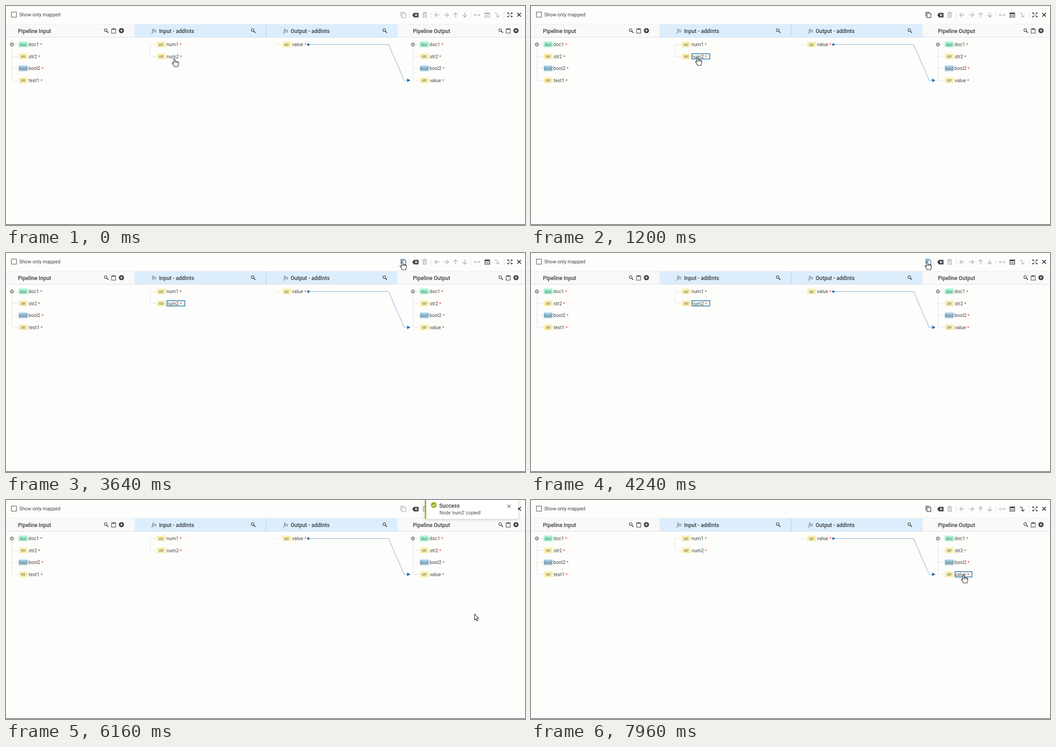
Write an HTML page that moves like this. It is 1151 by 486 pixels and loops after 8000 ms.

```html
<!DOCTYPE html>
<html lang="en">
<head>
<meta charset="utf-8">
<title>Pipeline mapping</title>
<style>
  html, body { margin: 0; width: 100%; height: 100%; overflow: hidden; background: #fdfdfc; }
  svg { display: block; width: 100%; height: 100%; font-family: Roboto, Arial, sans-serif; }
  text { white-space: pre; }
  .title { font-size: 12px; font-weight: 500; fill: #3c3c3c; }
  .label { font-size: 10.6px; fill: #444; }
  .badge { font-size: 9.1px; fill: #666; text-anchor: middle; }
  .icon { fill: none; stroke: currentColor; stroke-width: 1.4; }
  .icon .solid { fill: currentColor; stroke: none; }
  .tree { fill: none; stroke: #d3d3d3; stroke-dasharray: 1.5 .7; }
</style>
</head>
<body>
<svg id="stage" viewBox="0 0 1151 486" preserveAspectRatio="none"></svg>
<script>
const LOOP = 8000;
const DARK = [62, 62, 62], PALE = [181, 179, 173], BLUE = [38, 112, 170];
const rgb = c => `rgb(${c.map(Math.round)})`;
const mix = (a, b, k) => a.map((v, i) => v + (b[i] - v) * k);
const ramp = (t, from, to) => Math.min(1, Math.max(0, (t - from) / (to - from)));
const smooth = k => k * k * (3 - 2 * k);

const ICONS = {
  copy: `<path d="M-5.3 3.8V-5.9H3.2" stroke-width="1.2"/><rect x="-2.8" y="-3.4" width="8.4" height="9.3" stroke-width="1.3"/>`,
  erase: `<path class="solid" d="M-7 0L-3.4-5H6.8V5H-3.4Z"/><path d="M-1-2.4L3.8 2.4M3.8-2.4L-1 2.4" stroke="#fff" stroke-width="1.4"/>`,
  trash: `<path d="M-5.3-4H5.3M-2-4.4V-6H2V-4.4M-3.9-4L-3.4 5.4H3.4L3.9-4M-1.5-1.8V3.6M1.5-1.8V3.6" stroke-width="1.3"/>`,
  arrow: `<path d="M5.5 0H-5M-.3-4.8L-5.1 0L-.3 4.8" stroke-width="1.5"/>`,
  link: `<path d="M-5 0H5" stroke-dasharray="2 .8"/><path class="solid" d="M-7.2 0L-3.8-2.7V2.7ZM7.2 0L3.8-2.7V2.7Z"/>`,
  table: `<rect x="-5.3" y="-4.8" width="10.6" height="9.8" stroke-width="1.2"/><path class="solid" d="M-5.3-5H5.3V-2H-5.3Z"/><path d="M-3-.2V3.2M3-.2V3.2M-1.3-.2L1.3 3.2M1.3-.2L-1.3 3.2" stroke-width="1"/>`,
  bend: `<path d="M-5-4.5C-.5-4.6 1.7-2.2 1.7 3.5" stroke-width="1.5"/><path d="M-1.8 1.5L1.7 5L5.2 1.5" stroke-width="1.5"/>`,
  expand: `<path d="M-1.2-1.2L-4.8-4.8M1.2-1.2L4.8-4.8M-1.2 1.2L-4.8 4.8M1.2 1.2L4.8 4.8" stroke-width="1.3"/><path class="solid" d="M-5.6-5.3H-1.8L-5.6-1.5ZM5.6-5.3H1.8L5.6-1.5ZM-5.6 5.3H-1.8L-5.6 1.5ZM5.6 5.3H1.8L5.6 1.5Z"/>`,
  close: `<path d="M-4-4L4 4M4-4L-4 4" stroke-width="1.9"/>`,
  search: `<circle cx="-1.4" cy="-1.4" r="3" stroke-width="1.2"/><path d="M.9.9L4.6 4.6" stroke-width="1.7"/>`,
  clip: `<rect x="-4.6" y="-4.3" width="9.2" height="9.5" stroke-width="1.1"/><path class="solid" d="M-2.8-5H-1.2A1.3 1.3 0 0 1 1.2-5H2.8V-2.6H-2.8Z"/>`,
  add: `<circle class="solid" r="5.7"/><path d="M-3 0H3M0-3V3" stroke="#fff" stroke-width="1.3"/>`,
  node: `<circle class="solid" r="4.4"/><path d="M-2.3 0H2.3M0-2.3V2.3" stroke="#fff" stroke-width="1"/>`
};

const icon = (name, x, y, color = DARK, id = "", turn = 0) =>
  `<g class="icon" id="${id}" style="color:${rgb(color)}" transform="translate(${x} ${y}) rotate(${turn})">${ICONS[name]}</g>`;
const text = (cls, x, y, s) => `<text class="${cls}" x="${x}" y="${y}">${s}</text>`;
const rect = (x, y, w, h, fill, more = "") =>
  `<rect x="${x}" y="${y}" width="${w}" height="${h}" fill="${fill}" ${more}/>`;

const TINT = { doc: "#a5f5d0", str: "#f9efad", bool: "#a2cde3" };
const rowY = i => 85.3 + 26.6 * i;

function node(dx, i, type, name) {
  const y = rowY(i), inset = type === "str" ? .6 : 0;
  return rect(28 + dx + inset, y - 6.3, 20 - inset, 12.6, TINT[type], 'rx="1.5"') +
    text("badge", 38.3 + dx, y + 3.2, type) +
    text("label", 49.6 + dx + inset, y + 3.7, `${name} <tspan fill="#e5483d" dy="1">*</tspan>`);
}

function pipeline(dx, last) {
  const rows = [["doc", "doc1"], ["str", "str2"], ["bool", "bool2"], ["str", last]];
  const x = 13.3 + dx;
  return `<path class="tree" d="M${x} 90V162q0 3 3 3H${x + 15}M${x + 5} 85.5H${x + 15}M${x} 112H${x + 15}M${x} 138.5H${x + 15}"/>` +
    icon("node", 13 + dx, 85.5, [145, 145, 145]) +
    rows.map(([type, name], i) => node(dx, i, type, name)).join("");
}

function header(x, title, extras) {
  return text("title", x, 59.6, title) + extras;
}

const tools = dx => icon("search", 222.5 + dx, 55) + icon("clip", 238.7 + dx, 55) + icon("add", 256 + dx, 54.6);
const fn = x => `<text x="${x}" y="59" font-size="11.5" font-style="italic" fill="#555">ƒn</text>`;
const divider = x => rect(x, 13, 1, 14, "#dcdcdc");

const toolbar = [
  `<rect x="12" y="13.5" width="11.2" height="11.2" fill="#fff" stroke="#5a5a5a" stroke-width="1.2"/>`,
  `<text x="29.4" y="22.8" font-size="10.8" fill="#444">Show only mapped</text>`,
  icon("copy", 881, 19.8, PALE, "copy"),
  icon("erase", 908, 20.2),
  icon("trash", 928.6, 20, PALE),
  ...[[956, 0], [976.5, 180], [997, 90], [1017.5, 270]].map(([x, turn]) => icon("arrow", x, 19.8, PALE, "", turn)),
  icon("link", 1045, 20, PALE),
  icon("table", 1067.4, 20, PALE, "table"),
  icon("bend", 1089, 20, PALE, "bend"),
  icon("expand", 1117.5, 19.7),
  icon("close", 1138, 19.5),
  ...[894, 942, 1030, 1104].map(divider)
].join("");

const heads =
  rect(0, 40, 1151, 30, "#f9f9f9") +
  rect(0, 40, 1151, 1, "#ebebeb") + rect(0, 69, 1151, 1, "#dddde2") +
  rect(285, 41, 583.5, 28, "#dceefd") +
  rect(576, 41, 1, 28, "#a9c6e6") +
  header(26.4, "Pipeline Input", tools(0)) +
  header(339.4, "Input - addInts", fn(323.5) + icon("search", 548.5, 55)) +
  header(631.2, "Output - addInts", fn(615.5) + icon("search", 840.3, 55)) +
  header(902.4, "Pipeline Output", tools(875));

const nodes =
  pipeline(0, "test1") + pipeline(889.5, "value") +
  `<path class="tree" d="M333 85.5H319.7V109q0 3 3 3H334M598 85.5H611"/>` +
  node(305.6, 0, "str", "num1") + node(306.1, 1, "str", "num2") + node(584, 0, "str", "value");

const wire =
  `<circle cx="670.5" cy="85.5" r="2.6" fill="#2a70b0"/>
   <path d="M673 85.5H848.5L883 165H890" fill="none" stroke="#2f79b8" stroke-width="1.1" stroke-dasharray="1.8 1.2"/>
   <path d="M889.5 161L897 165L889.5 169Z" fill="#2a70b0"/>`;

const frame = (id, x, y, w) =>
  `<rect id="${id}" x="${x}" y="${y}" width="${w}" height="11.8" fill="none" stroke="#2877a8" stroke-width="1.6"/>`;

const toast =
  `<g id="toast">
    ${rect(929, -10, 207, 52, "#fff", 'style="filter:drop-shadow(0 1px 3px rgba(0,0,0,.22))"')}
    ${rect(929, -10, 3, 52, "#9ab800")}
    <circle cx="948.6" cy="11" r="6.4" fill="#8fb50f"/>
    <path d="M945.5 11.2L947.8 13.4L951.9 8.9" fill="none" stroke="#fff" stroke-width="1.4"/>
    ${text("title", 960.8, 17, "Success")}
    <text x="961.6" y="32.4" font-size="10.2" fill="#4a4a4a">Node 'num2' copied!</text>
    <path d="M1112 10.5L1118.8 17.3M1118.8 10.5L1112 17.3" stroke="#666" stroke-width="1.1"/>
  </g>`;

const pointer =
  `<g id="cursor" fill="#fff" stroke="#222" stroke-width="1.1" stroke-linejoin="round">
    <g id="hand">
      <path d="M-1.5 1.8A1.5 1.5 0 0 1 1.5 1.8V7C1.5 5.6 4.2 5.6 4.3 7.2C4.5 6.2 7 6.3 7 8C7.3 7.2 9.3 7.4 9.3 9.3V12.5C9.3 14.5 8 15 7.8 18.3H-.2C-.4 16-3 13.5-4.6 11C-5.6 9.3-3.6 8.3-2.6 9.5L-1.5 10.8Z"/>
      <path d="M1.5 7V10M4.3 7.2V10M7 8V10.5" fill="none" stroke-width=".9"/>
    </g>
    <path id="arrow" d="M0 0V13.5L3.1 10.6L5.2 15.4L7.3 14.5L5.3 9.8H9.6Z"/>
  </g>`;

const stage = document.getElementById("stage");
stage.innerHTML = rect(0, 0, 1151, 486, "#fdfdfc") + toolbar + heads + nodes + wire +
  frame("pickInput", 357, 105.8, 39.4) + frame("pickOutput", 940.4, 159, 37.4) +
  rect(0, 485, 1151, 1, "#111") + toast + pointer;

const part = Object.fromEntries(
  ["copy", "table", "bend", "pickInput", "pickOutput", "toast", "cursor", "hand", "arrow"]
    .map(id => [id, document.getElementById(id)]));
const show = (el, on) => { el.style.display = on ? "" : "none"; };

// time, x, y, eased
const PATH = [
  [0, 373.3, 116.5], [80, 373.3, 116.5], [400, 369.5, 113.5, 1],
  [2520, 369.5, 113.5], [2640, 675, 0], [2680, 780, -30], [2780, 990, -30],
  [2840, 1040, 4], [3000, 1100, 55], [3200, 1040, 66], [3400, 930, 42], [3600, 878.7, 19],
  [4400, 878.7, 19], [4440, 880.6, 19.3], [5880, 880.6, 19.3], [6160, 1039, 253, 1],
  [6400, 1039, 253], [7040, 957.5, 165, 1], [7160, 957.5, 165], [7200, 959.3, 166], [LOOP, 959.3, 166]
];

function cursorAt(t) {
  const i = PATH.findIndex(p => p[0] > t);
  const [t0, x0, y0] = PATH[i - 1], [t1, x1, y1, eased] = PATH[i];
  const k = ramp(t, t0, t1), e = eased ? smooth(k) : k;
  return [x0 + (x1 - x0) * e, y0 + (y1 - y0) * e];
}

function render(t) {
  const first = ramp(t, 900, 1200) - ramp(t, 4420, 4720);
  const second = ramp(t, 7660, 7960);
  const active = mix(PALE, DARK, first + second);
  const hover = ramp(t, 3520, 3720) - ramp(t, 4420, 4560);

  part.copy.style.color = rgb(mix(active, BLUE, hover));
  part.table.style.color = rgb(active);
  part.bend.style.color = rgb(mix(PALE, DARK, second));
  show(part.pickInput, t >= 920 && t < 4440);
  show(part.pickOutput, t >= 7680);
  part.toast.style.opacity = smooth(ramp(t, 4440, 4800)) - smooth(ramp(t, 7470, 7760));

  const [x, y] = cursorAt(t);
  const hand = t < 2560 || (t >= 3560 && t < 4440) || t >= 7020;
  part.cursor.setAttribute("transform", `translate(${x} ${y})`);
  show(part.hand, hand);
  show(part.arrow, !hand);
}

const start = performance.now();
function tick() {
  render((performance.now() - start) % LOOP);
  requestAnimationFrame(tick);
}
tick();
</script>
</body>
</html>
```
